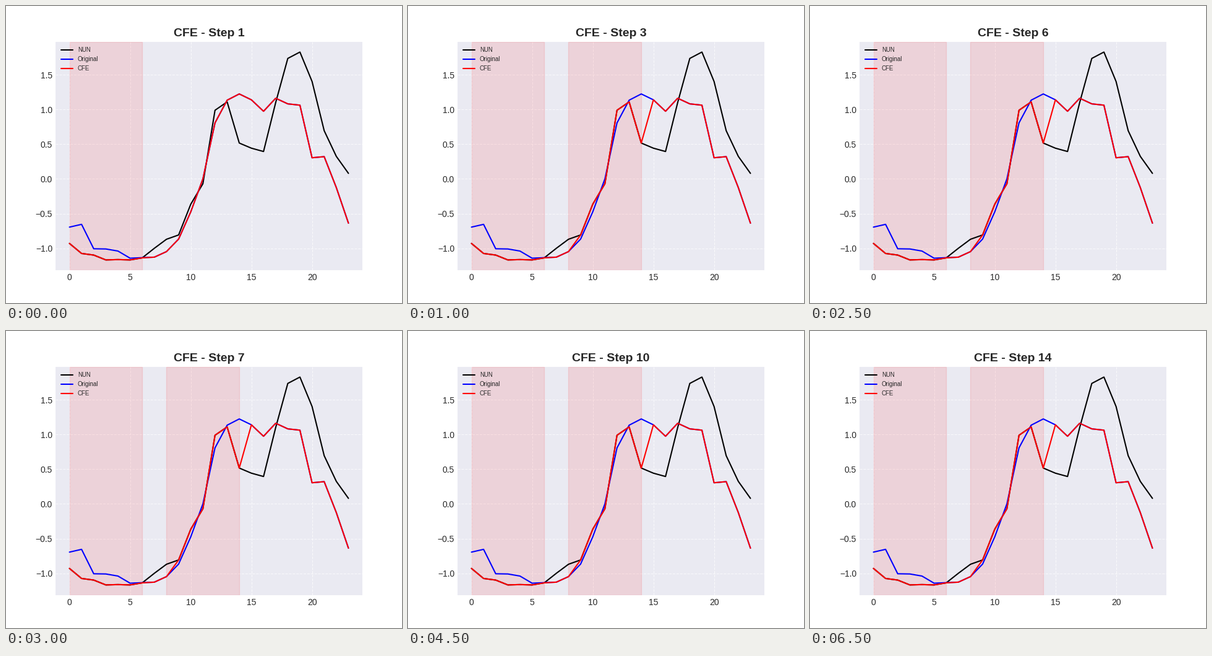
Write a matplotlib script that moves like this. It is 640 px wide and 480 px high and loops after 7000 ms.

```python
import numpy as np
import matplotlib.pyplot as plt
from matplotlib.animation import FuncAnimation

plt.style.use("seaborn-v0_8-darkgrid")
plt.rcParams.update({
    "font.family": "Liberation Sans",
    "font.size": 10,
    "figure.facecolor": "white",
    "axes.unicode_minus": True,
})

STEPS = 14
STEP_MS = 500

nun = np.array([
    -0.930, -1.075, -1.098, -1.168, -1.163, -1.168, -1.138, -1.000,
    -0.870, -0.808, -0.365, -0.070, 0.990, 1.110, 0.517, 0.443,
    0.395, 1.100, 1.737, 1.829, 1.405, 0.695, 0.325, 0.080])
query = np.array([
    -0.695, -0.655, -1.007, -1.010, -1.040, -1.143, -1.135, -1.128,
    -1.048, -0.867, -0.475, 0.000, 0.808, 1.135, 1.225, 1.140,
    0.975, 1.163, 1.082, 1.063, 0.305, 0.321, -0.125, -0.638])
x = np.arange(len(nun))

# Shaded intervals per step; most steps share the default pair.
DEFAULT = [(0, 6), (8, 14)]
SPANS = {1: [(0, 6)], 2: [(0, 6), (8, 23)], 9: [(0, 8)]}


def counterfactual(spans):
    """Take the neighbour's values inside the spans, the query's elsewhere."""
    swapped = np.zeros(len(x), bool)
    for start, end in spans:
        swapped |= (x <= end) & ((x > start) | (start == 0))
    return np.where(swapped, nun, query)


fig, ax = plt.subplots(figsize=(6.4, 4.8), dpi=100)


def draw(frame):
    step = frame + 1
    spans = SPANS.get(step, DEFAULT)
    ax.clear()
    ax.plot(x, nun, color="black", lw=1.5, label="NUN")
    ax.plot(x, query, color="blue", lw=1.5, label="Original")
    ax.plot(x, counterfactual(spans), color="red", lw=1.5, label="CFE")
    for start, end in spans:
        ax.axvspan(start, end, color="red", alpha=0.1)
    ax.set_xlim(-1.15, 24.15)
    ax.set_ylim(-1.318, 1.979)
    ax.set_xticks(range(0, 21, 5))
    ax.set_yticks(np.arange(-1, 1.6, 0.5))
    ax.grid(True, linestyle="--", linewidth=0.8, alpha=0.7)
    ax.legend(loc="upper left", fontsize=7, frameon=False)
    ax.set_title(f"CFE - Step {step}", fontsize=14, fontweight="bold")
    return []


anim = FuncAnimation(fig, draw, frames=STEPS, init_func=lambda: draw(0),
                     interval=STEP_MS, repeat=True, repeat_delay=0)
plt.show()
```
